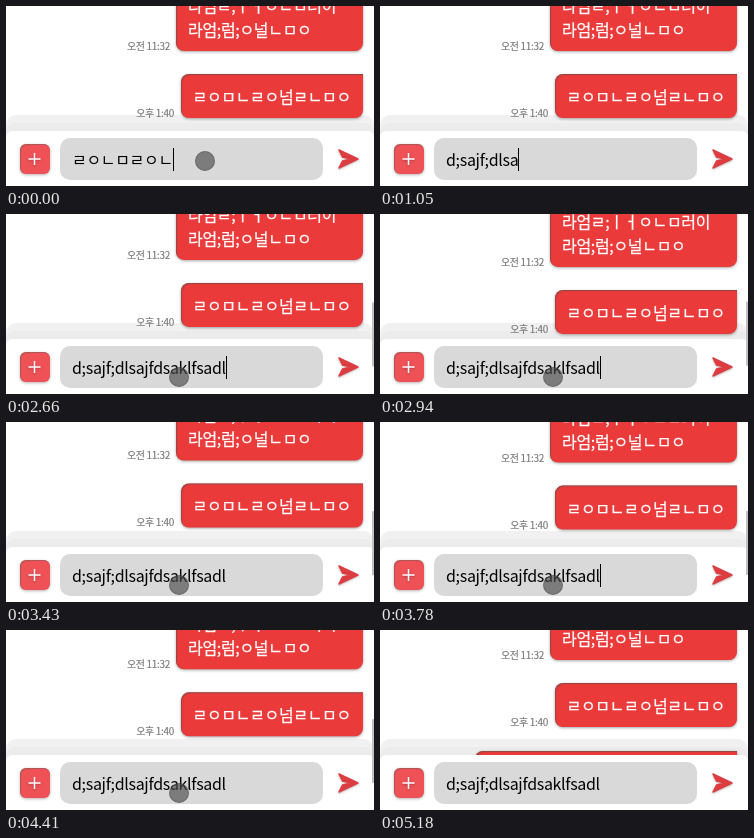
An HTML page that plays this animation: 368x180 px, repeating every 5250 ms.

```html
<!DOCTYPE html>
<html>
<head>
<meta charset="utf-8">
<style>
html, body { margin: 0; width: 100%; height: 100%; overflow: hidden; background: #fff; }
#stage {
  position: relative; width: 368px; height: 180px; overflow: hidden; background: #fff;
  font: 16px/24px "Noto Sans CJK JP", "Noto Sans CJK KR", "Noto Sans CJK", sans-serif;
  letter-spacing: -.02em; white-space: nowrap;
}
#stage div, svg { position: absolute; box-sizing: border-box; }
.strip { left: 0; right: 0; height: 40px; border-radius: 10px 10px 0 0; }
#log { left: 0; top: 0; width: 368px; height: 180px; }
.bubble {
  right: 11px; padding: 10px 12px; color: #fff; background: #ea3a3a;
  -webkit-text-stroke: .25px #fff; border-radius: 8px 0 8px 8px;
  box-shadow: 0 1px 3px rgba(0, 0, 0, .35), inset 1px 1px 1px rgba(90, 80, 80, .6);
}
.time { font-size: 10px; line-height: 14px; color: #777; -webkit-text-stroke: .15px #777; }
.panel { left: 0; right: 0; top: 125px; bottom: 0; background: #fff; border-radius: 6px 6px 0 0; }
.field { left: 54px; top: 132px; width: 263px; height: 42px; border-radius: 10px; background: #d9d9d9; }
.plus {
  left: 13.5px; top: 138px; width: 30px; height: 30px; border-radius: 6px; background: #ee5257;
  box-shadow: 0 1px 3px rgba(0, 0, 0, .3), inset 1px 1px 1px rgba(110, 90, 90, .5);
}
#text { left: 66px; top: 141.5px; line-height: 23px; color: #000; }
#caret { left: 100%; top: 0; width: 1px; height: 23px; background: #000; }
#pointer {
  left: -10px; top: -10.5px; width: 20px; height: 20px; border-radius: 50%;
  background: rgba(75, 75, 75, .65); border: 1px solid rgba(70, 70, 70, .35);
}
#thumb { left: 366px; top: 0; width: 2px; height: 64px; background: #c1c1c1; }
svg { left: 0; top: 0; filter: drop-shadow(0 1px 1px rgba(0, 0, 0, .25)); }
</style>
</head>
<body>
<div id="stage">
  <div class="strip" style="top:109px;background:#f1f1f1"></div>
  <div class="strip" style="top:117px;background:#ececec"></div>
  <div id="log">
    <div class="bubble" style="left:170px;bottom:135.5px">ㄹㅇㅁ니ㅏㅓㄹㄴㅁ;ㅣㅓ<br>라엄ㄹ;ㅣㅓㅇㄴㅁ러이<br>라엄;럼;ㅇ널ㄴㅁㅇ</div>
    <div class="time" style="right:204px;top:33px">오전 11:32</div>
    <div class="bubble" style="left:174.5px;top:68px">ㄹㅇㅁㄴㄹㅇ넘ㄹㄴㅁㅇ</div>
    <div class="time" style="right:200px;top:100px">오후 1:40</div>
    <div class="bubble" style="left:94.5px;top:136px;height:68px"></div>
  </div>
  <div class="panel"></div>
  <div class="field"></div>
  <div class="plus"></div>
  <svg width="368" height="180">
    <path d="M22.5 153h12M28.5 147v12" stroke="#fff" stroke-width="1.5"/>
    <path d="M333 144L352 153 333 162 336.5 155 345 153 336.5 151z"
      fill="#dc3d41" stroke="#dc3d41" stroke-width="1.5" stroke-linejoin="round"/>
  </svg>
  <div id="text"><span id="typed"></span><div id="caret"></div></div>
  <div id="pointer"></div>
  <div id="thumb"></div>
</div>
<script>
const LOOP = 5250, STEP = 70, BLINK = 515, TYPED_AT = 1540;
const before = 'ㄹㅇㄴㅁㄹㅇㄴ', after = 'd;sajf;dlsajfdsaklfsadl';
const [log, typed, caret, pointer, thumb] =
  ['log', 'typed', 'caret', 'pointer', 'thumb'].map(id => document.getElementById(id));

// keys: [time, value], eased between turning points
const scrollKeys = [[2550, 0], [3110, 10], [3640, -15], [4080, 31], [4550, -15]];
const pointerX = [[1960, 190], [2030, 187], [2310, 173]];
const pointerY = [[1960, 147], [2030, 141], [2310, 163], [4620, 163], [4690, 172]];

function at(keys, t) {
  const i = keys.findIndex(k => k[0] > t);
  if (i === 0) return keys[0][1];
  if (i < 0) return keys[keys.length - 1][1];
  const [t0, a] = keys[i - 1], [t1, b] = keys[i];
  return a + (b - a) * (1 - Math.cos(Math.PI * (t - t0) / (t1 - t0))) / 2;
}

function textAt(t) {
  if (t < 680) return before.slice(0, Math.max(0, 7 - Math.max(0, Math.floor((t - 300) / 50))));
  const n = 11 + (t - 1050) / (t < 1050 ? 32 : 40.5);
  return after.slice(0, Math.max(0, Math.floor(n)));
}

function caretOn(t) {
  if (t < TYPED_AT) return t < 180 || t > 330;
  return Math.floor((t - TYPED_AT) / BLINK) % 2 === 0;
}

const show = (el, on) => el.style.visibility = on ? 'visible' : 'hidden';
const move = (el, x, y) => el.style.transform = `translate(${x}px, ${y}px)`;

function draw(now) {
  const t = Math.floor(now % LOOP / STEP) * STEP;
  const scroll = at(scrollKeys, t);
  move(log, 0, scroll);
  move(thumb, 0, 88.5 - scroll * .11);
  thumb.style.opacity = t < 2590 ? 0 : Math.max(0, Math.min(1, (5150 - t) / 250));
  typed.textContent = textAt(t);
  show(caret, caretOn(t));
  show(pointer, t < 210 || t >= 1960 && t < 4760);
  if (t < 210) move(pointer, 199, 155);
  else move(pointer, at(pointerX, t), at(pointerY, t));
  requestAnimationFrame(frame);
}

const start = performance.now();
function frame() { draw(performance.now() - start); }
frame();
</script>
</body>
</html>
```
